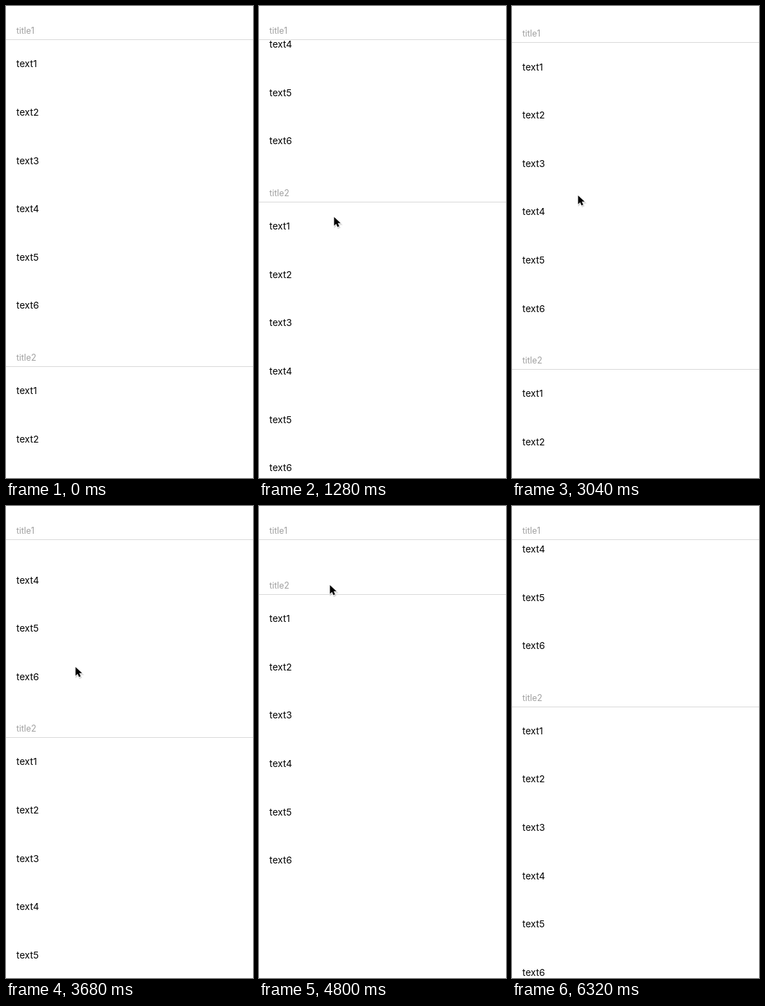
Recreate the animation shown at these times as an HTML page. Size 357 by 680 pixels, loop 6880 ms.

```html
<!DOCTYPE html>
<html lang="en">
<head>
<meta charset="utf-8">
<title>Sticky section headers</title>
<style>
  html, body { margin: 0; width: 100%; height: 100%; overflow: hidden; background: #fff; }
  svg { display: block; width: 357px; height: 680px; }
  text { font-family: Inter, Roboto, sans-serif; }
  .row { font-size: 13.6px; fill: #000; }
  .title { font-size: 12.4px; fill: #a0a0a0; }
</style>
</head>
<body>
<svg viewBox="0 0 357 680">
  <g id="rows"></g>
  <g id="heads"></g>
  <rect width="357" height="18" fill="#fff"/>
  <g id="cursor">
    <g transform="scale(.86)">
      <path d="M1 2v14.5l3.5-3.2 2.4 5.4 2.7-1.2-2.4-5.2h4.8z" opacity=".14" stroke="#000" stroke-width="2"/>
      <path d="M0 0v14.5l3.5-3.2 2.4 5.4 2.7-1.2-2.4-5.2h4.8z" stroke="#fff" paint-order="stroke"/>
    </g>
  </g>
</svg>
<script>
const LOOP = 6880, STEP = 80;
const ROW = 69.6, SECTION = 470.7, HEAD = 30, REST = 230.2;
const SHOW = 160, HIDE = 5120;

// Each swipe ends at a time and a scroll offset.
const swipes = [
  [0, 0], [880, 0], [1280, 237], [1600, REST], [2240, REST], [3040, -4.2],
  [3280, 0], [3680, 185.6], [4400, 242], [4800, 392], [5520, 518.6], [6320, REST]
];
// Turning points of the pointer: time, x, y
const turns = [
  [SHOW, 352, 540], [640, 106, 618], [1280, 108.5, 304], [2240, 100, 38],
  [3040, 95.5, 273], [3280, 98, 415], [3680, 100.5, 232], [4320, 104, 500],
  [4800, 102.5, 114], [HIDE, 102, 36]
];

const NS = "http://www.w3.org/2000/svg";
const [rows, headers, cursor] = ["rows", "heads", "cursor"].map(id => document.getElementById(id));

const smooth = u => u * u * (3 - 2 * u);
const easeOut = u => 1 - (1 - u) ** 2;
const spring = u => u < 1 ? 1 - (1 + 8.8 * u) * Math.exp(-8.8 * u) : 1;

function add(parent, tag, attrs, label = "") {
  const el = document.createElementNS(NS, tag);
  for (const name in attrs) el.setAttribute(name, attrs[name]);
  el.textContent = label;
  return parent.appendChild(el);
}

function move(el, x, y) {
  el.setAttribute("transform", `translate(${x} ${y})`);
}

// The two keys around t, and how far t lies between them.
function span(keys, t) {
  const i = Math.max(1, keys.findIndex(k => k[0] >= t));
  const a = keys[i - 1], b = keys[i];
  return [a, b, Math.max(0, (t - a[0]) / (b[0] - a[0]))];
}

function scrollAt(t) {
  const [a, b, u] = span(swipes, Math.min(t, swipes.at(-1)[0]));
  const ease = b[1] === REST ? spring : easeOut;
  return a[1] + (b[1] - a[1]) * ease(u);
}

function pointerAt(t) {
  const [a, b, u] = span(turns, t);
  return [1, 2].map(c => a[c] + (b[c] - a[c]) * smooth(u));
}

for (let s = 0; s < 2; s++)
  for (let i = 0; i < 6; i++)
    add(rows, "text", { class: "row", x: 15.1, y: 88.4 + s * SECTION + i * ROW }, "text" + (i + 1));

const heads = [1, 2].map(n => {
  const g = add(headers, "g", {});
  add(g, "rect", { y: 18, width: 357, height: HEAD, fill: "#fff" });
  add(g, "text", { class: "title", x: 15, y: 40.3 }, "title" + n);
  add(g, "rect", { y: 48, width: 357, height: 1, fill: "#d9d9d9" });
  return g;
});

function draw(t) {
  const s = scrollAt(t);
  const second = Math.max(0, SECTION - s);
  const first = Math.min(Math.max(0, -s), second - HEAD - 1);
  move(rows, 0, -s);
  move(heads[0], 0, Math.round(first));
  move(heads[1], 0, Math.round(second));
  const shown = t >= SHOW && t <= HIDE;
  cursor.style.display = shown ? "" : "none";
  if (shown) move(cursor, ...pointerAt(t));
}

const start = performance.now();
function tick() {
  const t = (performance.now() - start) % LOOP;
  draw(Math.floor(t / STEP) * STEP);
  requestAnimationFrame(tick);
}
draw(0);
requestAnimationFrame(tick);
</script>
</body>
</html>
```
